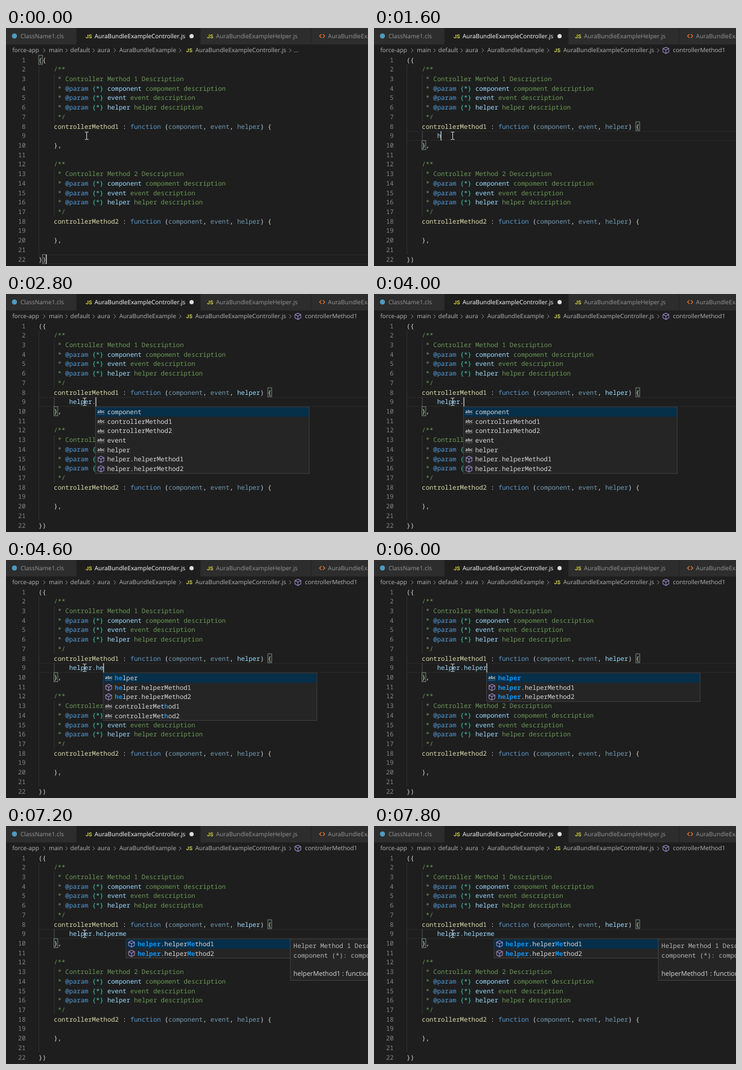
Recreate the animation shown at these times as an HTML page. Size 600 by 394 pixels, loop 8000 ms.

```html
<!DOCTYPE html>
<html lang="en">
<head>
<meta charset="utf-8">
<title>Code completion</title>
<style>
html, body { margin: 0; width: 100%; height: 100%; overflow: hidden; background: #1e1e1e; }
svg { display: block; width: 600px; height: 394px; }
text { white-space: pre; text-rendering: geometricPrecision; fill: #d8d8d8; }
.mono { font: 500 10.55px "Noto Sans Mono", "DejaVu Sans Mono", monospace; }
.ui { font: 9.95px "Open Sans", "Noto Sans", sans-serif; }
.doc { font-size: 10.8px; }
.js { font: 700 8.6px Inter, sans-serif; fill: #cbcb41; }
.abc { font: 700 7px "Open Sans", sans-serif; fill: #d0d0d0; }
.num { fill: #858585; font-weight: 400; text-anchor: end; }
.dim { fill: #969696; }
.crumb { fill: #b6b6b6; }
.on { fill: #fff; }
.c { fill: #6a9955; font-weight: 400; }
.k { fill: #569cd6; }
.t { fill: #4ec9b0; }
.v { fill: #9cdcfe; }
.u { fill: #729bb1; }
.f { fill: #dcdcaa; }
.hit { fill: #1291ea; font-weight: 700; }
.line { fill: none; stroke-linecap: round; stroke-linejoin: round; }
</style>
</head>
<body>
<svg id="stage" viewBox="0 0 600 394"></svg>
<script>
const CH = 6.33, ROW = 15.71, LEFT = 54, TOP = 45, LOOP = 8000;
const colX = c => LEFT + c * CH;
const lineY = n => TOP + (n - 1) * ROW;

const rect = (x, y, w, h, fill, extra = '') =>
  `<rect x="${x}" y="${y}" width="${w}" height="${h}" fill="${fill}" ${extra}/>`;
const text = (x, y, cls, s) => `<text x="${x}" y="${y}" class="${cls}">${s}</text>`;
const span = (cls, s) => `<tspan class="${cls}">${s}</tspan>`;
const stroke = (d, color, w = 1) =>
  `<path class="line" d="${d}" stroke="${color}" stroke-width="${w}"/>`;
const cube = (x, y) => stroke(
  `M${x} ${y - 5.3}l4.9 2.4v5.4l-4.9 2.7l-4.9-2.7v-5.4zm-4.9 2.4l4.9 2.4l4.9-2.4m-4.9 2.4v5.7`,
  '#9787c6', 1.1);
const bracket = (col, n) =>
  rect(colX(col) + .2, lineY(n) + .2, CH, ROW - .8, '#1d251d', 'stroke="#888" stroke-width=".9"');

function tabs() {
  const base = 16.7;
  return rect(0, 0, 600, 27.3, '#252526') +
    rect(0, 0, 116.5, 27.3, '#2d2d2d') +
    rect(117.3, 0, 204.5, 27.3, '#1e1e1e') +
    rect(322.6, 0, 182.7, 27.3, '#2d2d2d') +
    rect(506.1, 0, 94, 27.3, '#2d2d2d') +
    '<circle cx="14" cy="13.3" r="4.2" fill="#4a9cc4"/>' +
    text(24, base, 'ui dim', 'ClassName1.cls') +
    text(132, base - .1, 'js', 'JS') +
    text(146.8, base, 'ui on', 'AuraBundleExampleController.js') +
    '<circle cx="307.6" cy="13.4" r="3.5" fill="#dcdcdc"/>' +
    text(333, base - .1, 'js', 'JS') +
    text(348, base, 'ui dim', 'AuraBundleExampleHelper.js') +
    stroke('M522.3 10.8l-2.7 2.6l2.7 2.6m3.4-5.2l2.7 2.6l-2.7 2.6', '#e37933', 1.3) +
    text(533.6, base, 'ui dim', 'AuraBundleExampleController.cmp');
}

function crumbs() {
  const parts = [[10.5, 'force-app'], [71, 'main'], [106.6, 'default'], [151.6, 'aura'],
    [187.7, 'AuraBundleExample'], [313.8, 'AuraBundleExampleController.js']];
  return parts.map(([x, s]) => text(x, 40.3, 'ui crumb', s)).join('') +
    [62, 99, 144, 179, 287.3, 469.7].map(x =>
      stroke(`M${x} 34.2l2.8 2.9l-2.8 2.9`, '#999', .9)).join('') +
    text(298.6, 40.2, 'js', 'JS');
}

function method(n, first) {
  const doc = (name, words) => span('c', '     * ') + span('k', '@param ') +
    span('t', '{*} ') + span('v', name) + span('c', ' ' + words + ' description');
  const used = n === 1 ? '<tspan class="u" id="used">helper</tspan>' : span('u', 'helper');
  const rows = [
    span('c', '    /**'),
    span('c', `     * Controller Method ${n} Description`),
    doc('component', 'compoment'),
    doc('event', 'event'),
    doc('helper', 'helper'),
    span('c', '     */'),
    span('f', `    controllerMethod${n}`) + ' : ' + span('k', 'function') + ' (' +
      span('u', 'component') + ', ' + span('u', 'event') + ', ' + used + ') {',
    '',
    '    },'
  ];
  return rows.map((s, i) => codeLine(first + i, s)).join('');
}

function codeLine(n, s) {
  return text(LEFT, lineY(n) + 11.6, 'mono', s);
}

function guide(col, from, to, color = '#3a3a3a') {
  return rect(colX(col) + .3, lineY(from), .8, (to - from + 1) * ROW, color);
}

function code() {
  let out = guide(0, 2, 21) + guide(4, 3, 7) + guide(4, 13, 17);
  for (let n = 1; n <= 22; n++) out += text(32.7, lineY(n) + 11.6, 'mono num', n);
  return out + codeLine(1, '({') + method(1, 2) + method(2, 12) + codeLine(22, '})');
}

const labels = ['component', 'controllerMethod1', 'controllerMethod2', 'event', 'helper',
  'helper.helperMethod1', 'helper.helperMethod2'];

function choices(word) {
  if (!word) return labels;
  if (word.length > 6) return labels.slice(5);
  const own = labels.slice(4);
  return word.length > 2 ? own : own.concat(labels.slice(1, 3));
}

function marked(label, word) {
  const ranges = !word ? [] : label[0] === 'c' ? [[13, 1]] :
    word.length > 6 ? [[0, 6], [13, word.length - 6]] : [[0, word.length]];
  let out = '', at = 0;
  for (const [start, len] of ranges) {
    out += label.slice(at, start) + span('hit', label.slice(start, start + len));
    at = start + len;
  }
  return out + label.slice(at);
}

function popup(x, word, details) {
  const list = choices(word), y = lineY(10) + .7, w = details ? 471.3 - x : 354;
  const edge = 'stroke="#454545" stroke-width=".9"';
  let out = rect(x, y, w, list.length * ROW, '#252526', edge) +
    rect(x + .5, y + .5, w - 1, ROW - .3, '#062f4a');
  list.forEach((label, i) => {
    const top = y + .3 + i * ROW, mid = top + ROW / 2;
    out += label.includes('.') ? cube(x + 9, mid) :
      text(x + 2.9, mid + 2.1, 'abc', 'abc') +
      stroke(`M${x + 3.4} ${mid + 3.8}h11`, '#8a8a8a', .6);
    out += text(x + 19.2, top + 11.4, 'mono', marked(label, word));
  });
  if (details) {
    out += rect(471.3, y, 140, 68.4, '#252526', edge) +
      text(476.6, 201.9, 'mono crumb', 'Helper Method 1 Description') +
      text(476.6, 217.6, 'mono crumb', 'component (*): compoment description') +
      text(476.4, 247.6, 'ui doc', 'helperMethod1 : function');
  }
  return out;
}

// Typed text on line 9 by time
const typing = [[0, ''], [1600, 'h'], [1800, 'he'], [2000, 'hel'], [2200, 'help'],
  [2400, 'helpe'], [2600, 'helper'], [2800, 'helper.'], [4400, 'helper.h'],
  [4600, 'helper.he'], [4800, 'helper.help'], [5000, 'helper.helper'],
  [6200, 'helper.helperm'], [6400, 'helper.helperme']];
// Spans with the caret hidden
const blinks = [[1000, 1400], [3400, 3800], [5600, 6000], [6800, 7400], [7800, 8000]];
const CLICK = 400;

function under(t) {
  const clicked = t >= CLICK, n = clicked ? 9 : 22;
  const edge = y => rect(LEFT, y, 546, 1, '#2b2b2b');
  return edge(lineY(n)) + edge(lineY(n + 1) - 1) +
    (clicked ? bracket(60, 8) + bracket(4, 10) : bracket(0, 1) + bracket(1, 22));
}

function over(t) {
  const clicked = t >= CLICK;
  const typed = typing.filter(e => e[0] <= t).pop()[1];
  const caretX = clicked ? colX(8 + typed.length) : colX(2);
  let out = t < 600 ? text(477, 40.3, 'ui crumb', '...') :
    cube(483.8, 37) + text(495.6, 40.3, 'ui crumb', 'controllerMethod1');
  if (typed) out += guide(4, 9, 9, '#606060') + codeLine(9, '        ' + span('v', typed));
  if (!blinks.some(([a, b]) => t >= a && t < b))
    out += rect(caretX - .6, lineY(clicked ? 9 : 22) + .2, 1.3, ROW - .4, '#d0d0d0');
  if (t >= 1800) out += popup(caretX - .5, typed.split('.').pop(), t >= 6400);
  const mx = t < 200 ? 133.7 : 130.4;
  return out + stroke(
    `M${mx - 2.6} 172.2h1.6q1 0 1 1q0-1 1-1h1.6m-2.6 1v10.4q0 1-1 1h-1.6m2.6-1q0 1 1 1h1.6`,
    '#e0e0e0', 1);
}

const stage = document.getElementById('stage');
stage.innerHTML = rect(0, 0, 600, 394, '#1e1e1e') + '<g id="under"></g>' +
  tabs() + crumbs() + code() + '<g id="over"></g>';
const low = document.getElementById('under'), high = document.getElementById('over');
const used = document.getElementById('used');
let shown = -1;

function draw(now) {
  const t = Math.floor(now % LOOP / 200) * 200;
  if (t !== shown) {
    shown = t;
    low.innerHTML = under(t);
    high.innerHTML = over(t);
    used.setAttribute('class', t >= 2800 ? 'v' : 'u');
  }
}
function tick() {
  draw(performance.now());
  requestAnimationFrame(tick);
}
tick();
</script>
</body>
</html>
```
